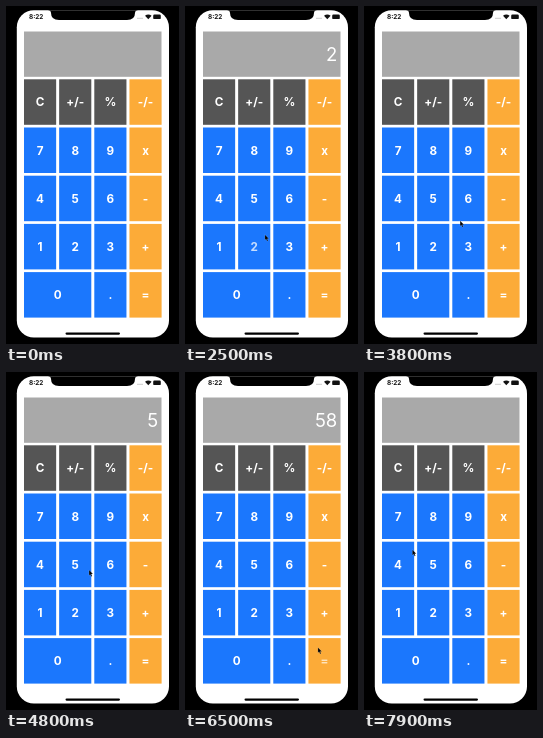
Animation, 173 px wide and 338 px high, one loop 8 s. Source, as an HTML page:

```html
<!DOCTYPE html>
<html lang="en">
<head>
<meta charset="utf-8">
<title>Calculator</title>
<style>
  html, body { margin: 0; width: 100%; height: 100%; overflow: hidden; background: #000; }
  svg { display: block; width: 173px; height: 338px; }
  text { font-family: Inter, Roboto, sans-serif; fill: #fff; }
  .key { font-size: 11.7px; font-weight: 700; text-anchor: middle; }
  #display { font-size: 18.5px; font-weight: 400; text-anchor: end; }
  .clock { font-size: 6.4px; font-weight: 700; fill: #111; }
</style>
</head>
<body>
<svg viewBox="0 0 173 338">
  <defs>
    <clipPath id="screen"><rect x="10.8" y="4.2" width="152.2" height="327.3" rx="17"/></clipPath>
  </defs>
  <rect width="173" height="338"/>
  <g clip-path="url(#screen)">
    <rect x="10" y="3" width="154" height="330" fill="#fff"/>
    <path d="M42 4Q45 4.5 45 7Q45 14 53 14H121Q129 14 129 7Q129 4.5 132 4Z"/>
    <text class="clock" x="23" y="13.2">8:22</text>
    <path d="M131.5 12.3H137" stroke="#999" stroke-dasharray="1 1"/>
    <path d="M142.3 13.2L139 9.8Q142.3 7.2 145.6 9.8Z" fill="#111"/>
    <rect x="147.2" y="8.5" width="7.6" height="4.6" rx="1.2" fill="#111"/>
    <rect x="59.5" y="326.5" width="54.5" height="2.2" rx="1.1"/>
    <rect x="18" y="25.5" width="137.5" height="45.3" fill="#a9a9a9"/>
    <text id="display" x="152.3" y="54.8"></text>
    <g id="keys"></g>
    <path id="cursor" d="M0 0V5.4L1.2 4.3L2.2 6.5L3.1 6.1L2.2 4H3.9Z" stroke="#fff" stroke-opacity=".5" stroke-width=".3"/>
  </g>
</svg>
<script>
const LOOP = 8000, STEP = 100, HOLD = 100, TRAVEL = 700;
const GRAY = '#555', BLUE = '#1b77fd', ORANGE = '#fcab38';
const COL = 35.15, ROW = 48.2, GAP = 3;
const rows = ['C +/- % -/-', '7 8 9 x', '4 5 6 -', '1 2 3 +', '0 . ='];
const keys = {};
const $ = id => document.getElementById(id);

function add(tag, attrs) {
  const el = document.createElementNS('http://www.w3.org/2000/svg', tag);
  for (const name in attrs) el.setAttribute(name, attrs[name]);
  return $('keys').appendChild(el);
}

rows.forEach((row, r) => {
  let col = 0;
  for (const name of row.split(' ')) {
    const span = name === '0' ? 2 : 1;
    const x = 18 + col * COL, y = 73.3 + r * ROW;
    const width = span * COL - GAP, height = ROW - GAP + 0.3;
    const fill = col === 3 ? ORANGE : r ? BLUE : GRAY;
    add('rect', { x, y, width, height, fill });
    const cx = x + width / 2, cy = y + height / 2;
    const label = add('text', { class: 'key', x: cx, y: cy + 4.3 });
    label.textContent = name;
    keys[name] = { cx, cy, label };
    col += span;
  }
});

// Each tap: key, time, and where the pointer rests relative to the key's centre
const taps = [
  ['2', 2250, 3, -13], ['+', 3300, -2, -4], ['5', 4400, 0, 8], ['6', 5200, 0, 2],
  ['=', 6300, -7, -9], ['-', 7150, 0, 7], ['4', 8050, 13, -15]
].map(([name, time, dx, dy]) => {
  const { cx, cy, label } = keys[name];
  return { name, time, label, x: cx + dx, y: cy + dy };
});
const stops = [{ time: 1300, x: 168, y: 319 }, ...taps];

const smooth = k => k * k * (3 - 2 * k);
const clamp = k => Math.min(1, Math.max(0, k));

// The pointer leaves after each release and glides to the next key
function cursorAt(t) {
  let { x, y } = stops[0];
  for (let i = 1; i < stops.length; i++) {
    const k = smooth(clamp((t - stops[i - 1].time - HOLD) / TRAVEL));
    x += (stops[i].x - x) * k;
    y += (stops[i].y - y) * k;
  }
  return [x, y];
}

function readout(t) {
  let text = '', sum = 0;
  for (const { name, time } of taps) {
    if (t < time + HOLD) break;
    if (/\d/.test(name)) text += name;
    else if (name === '=') text = String(sum + Number(text));
    else [sum, text] = [Number(text), ''];
  }
  return text;
}

// A pressed label dims, then fades back in
const labelOpacity = age => age < 0 ? 1 : 0.5 + 0.5 * clamp((age - HOLD) / 300);

function draw(now) {
  const t = Math.floor(now % LOOP / STEP) * STEP;
  const [x, y] = cursorAt(t);
  $('cursor').setAttribute('transform', `translate(${x} ${y})`);
  $('cursor').style.visibility = t > stops[0].time ? 'visible' : 'hidden';
  $('display').textContent = readout(t);
  for (const { label, time } of taps) label.style.opacity = labelOpacity(t - time);
}

const began = performance.now();
function tick() {
  draw(performance.now() - began);
  requestAnimationFrame(tick);
}
tick();
</script>
</body>
</html>
```
